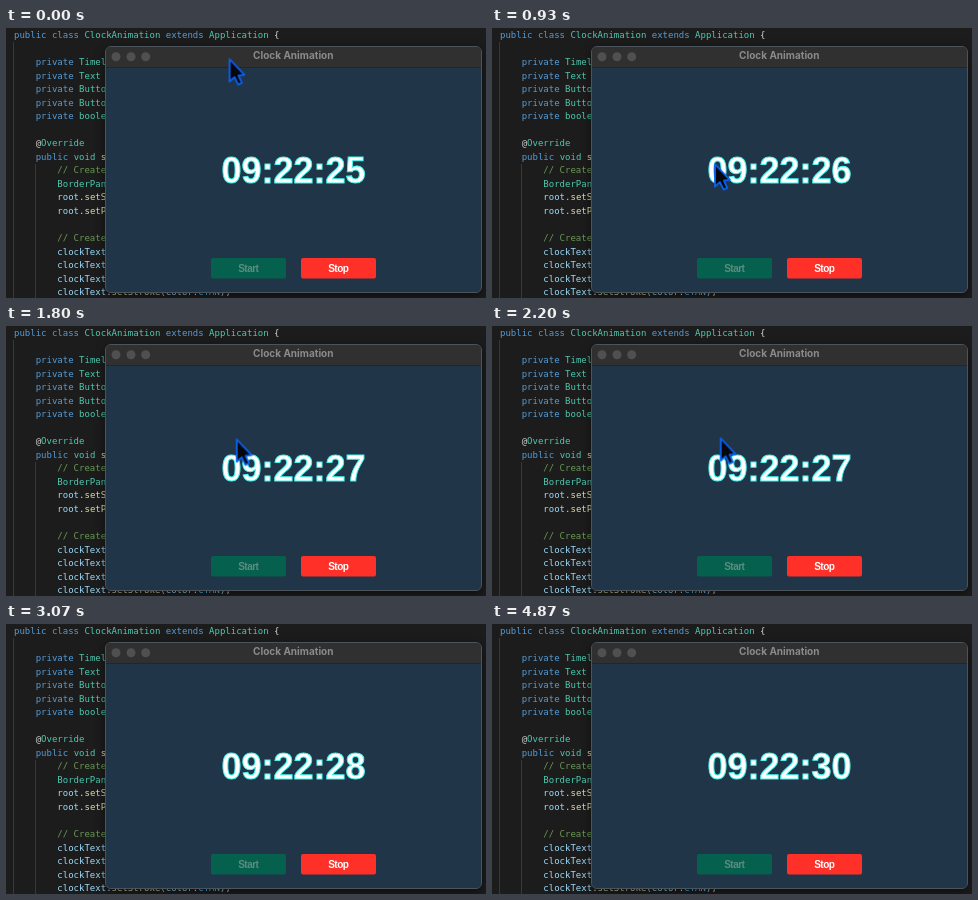
Recreate the animation shown at these times as an HTML page. Size 480 px wide and 270 px high, loop 4.94 s.

```html
<!DOCTYPE html>
<html lang="en">
<head>
<meta charset="utf-8">
<title>Clock Animation</title>
<style>
  html, body { margin: 0; width: 100%; height: 100%; overflow: hidden; background: #1c1c1c; }
  .stage { position: relative; width: 480px; height: 270px; overflow: hidden; }

  pre {
    position: absolute; left: 8px; top: 1px; margin: 0;
    font: 9px/13.53px "DejaVu Sans Mono", monospace;
    color: #d4d4d4;
  }
  pre i { font-style: normal; }
  .k { color: #569cd6; }
  .t { color: #4ec9b0; }
  .v { color: #9cdcfe; }
  .f { color: #dcdcaa; }
  .c { color: #6a9955; }
  .n { color: #4fc1ff; }

  .guide { position: absolute; width: 1px; bottom: 0; background: #383838; }

  .window {
    position: absolute; left: 99px; top: 18px; width: 377px; height: 247px;
    box-sizing: border-box; border: 1px solid #4b545b; border-radius: 6px;
    overflow: hidden; background: #213549;
    background-clip: padding-box;
  }
  .shade {
    position: absolute; left: 99px; top: 18px; width: 377px; height: 247px;
    border-radius: 6px; box-shadow: 0 3px 10px rgba(0, 0, 0, .5);
  }
  .bar { height: 20px; background: #303031; border-bottom: 1px solid #1b2832; }

  svg { position: absolute; left: 0; top: 0; }
  text { text-anchor: middle; font-weight: 700; }
  .title { font: 700 10px Inter, sans-serif; fill: #8b8b8c; }
  .label { font: 700 10px "Liberation Sans", Arial, sans-serif; letter-spacing: -.5px; }
  .clock text {
    font: 700 36px "Liberation Sans", Arial, sans-serif;
    fill: #fff; stroke: #42f5f0; stroke-width: 1;
  }

  .strip { animation: tick 4940ms step-end infinite; }
  @keyframes tick {
    0%     { transform: translateY(0); }
    6.07%  { transform: translateY(-50px); }
    26.32% { transform: translateY(-100px); }
    46.56% { transform: translateY(-150px); }
    66.8%  { transform: translateY(-200px); }
    87.04% { transform: translateY(-250px); }
  }

  .cursor {
    fill: #05070d; stroke: #0a62f2; stroke-width: 1.8; stroke-linejoin: round;
    animation: move 4940ms ease-in-out infinite, hide 4940ms step-end infinite;
  }
  @keyframes move {
    0%, 1.4%     { transform: translate(223.6px, 31.2px); }
    17%, 19.5%   { transform: translate(223px, 136.2px); }
    28%, 32%     { transform: translate(231.8px, 114px); }
    43%, 100%    { transform: translate(228.7px, 112.4px); }
  }
  @keyframes hide {
    0%   { visibility: visible; }
    53%, 100% { visibility: hidden; }
  }
</style>
</head>
<body>
<div class="stage">
  <div class="guide" style="left:7px; top:14px"></div>
  <div class="guide" style="left:29px; top:136px"></div>
<pre><i class="k">public class</i> <i class="t">ClockAnimation</i> <i class="k">extends</i> <i class="t">Application</i> {

    <i class="k">private</i> <i class="t">Timeline</i>
    <i class="k">private</i> <i class="t">Text</i>
    <i class="k">private</i> <i class="t">Button</i>
    <i class="k">private</i> <i class="t">Button</i>
    <i class="k">private</i> <i class="t">boolean</i>

    @<i class="t">Override</i>
    <i class="k">public</i> <i class="t">void</i> <i class="f">start</i>
        <i class="c">// Create</i>
        <i class="t">BorderPane</i>
        <i class="v">root</i>.<i class="f">setStyle</i>
        <i class="v">root</i>.<i class="f">setPadding</i>

        <i class="c">// Create</i>
        <i class="v">clockText</i>
        <i class="v">clockText</i>
        <i class="v">clockText</i>
        <i class="v">clockText</i>.<i class="f">setStroke</i>(<i class="v">Color</i>.<i class="n">CYAN</i>);</pre>

  <div class="shade"></div>
  <div class="window"><div class="bar"></div></div>

  <svg width="480" height="270" viewBox="0 0 480 270">
    <g fill="#505051">
      <circle cx="110" cy="28.7" r="4.5"/>
      <circle cx="125" cy="28.7" r="4.5"/>
      <circle cx="139.7" cy="28.7" r="4.5"/>
    </g>
    <text class="title" x="287.3" y="31">Clock Animation</text>

    <svg class="clock" x="0" y="117" width="480" height="50" overflow="hidden">
      <g class="strip">
        <text x="287.5" y="38">09:22:25</text>
        <text x="287.5" y="88">09:22:26</text>
        <text x="287.5" y="138">09:22:27</text>
        <text x="287.5" y="188">09:22:28</text>
        <text x="287.5" y="238">09:22:29</text>
        <text x="287.5" y="288">09:22:30</text>
      </g>
    </svg>

    <rect x="205" y="230" width="75" height="20.5" rx="2" fill="#05604d"/>
    <text class="label" x="242.3" y="243.7" fill="#5b8d80">Start</text>
    <rect x="295" y="230" width="75" height="20.5" rx="2" fill="#ff3028"/>
    <text class="label" x="332.3" y="243.7" fill="#fff">Stop</text>

    <path class="cursor" d="M0 0V22.2L4.9 17.9 8.6 25.4 12.2 23.7 8.9 16.3 14.8 15.7Z"/>
  </svg>
</div>
</body>
</html>
```
